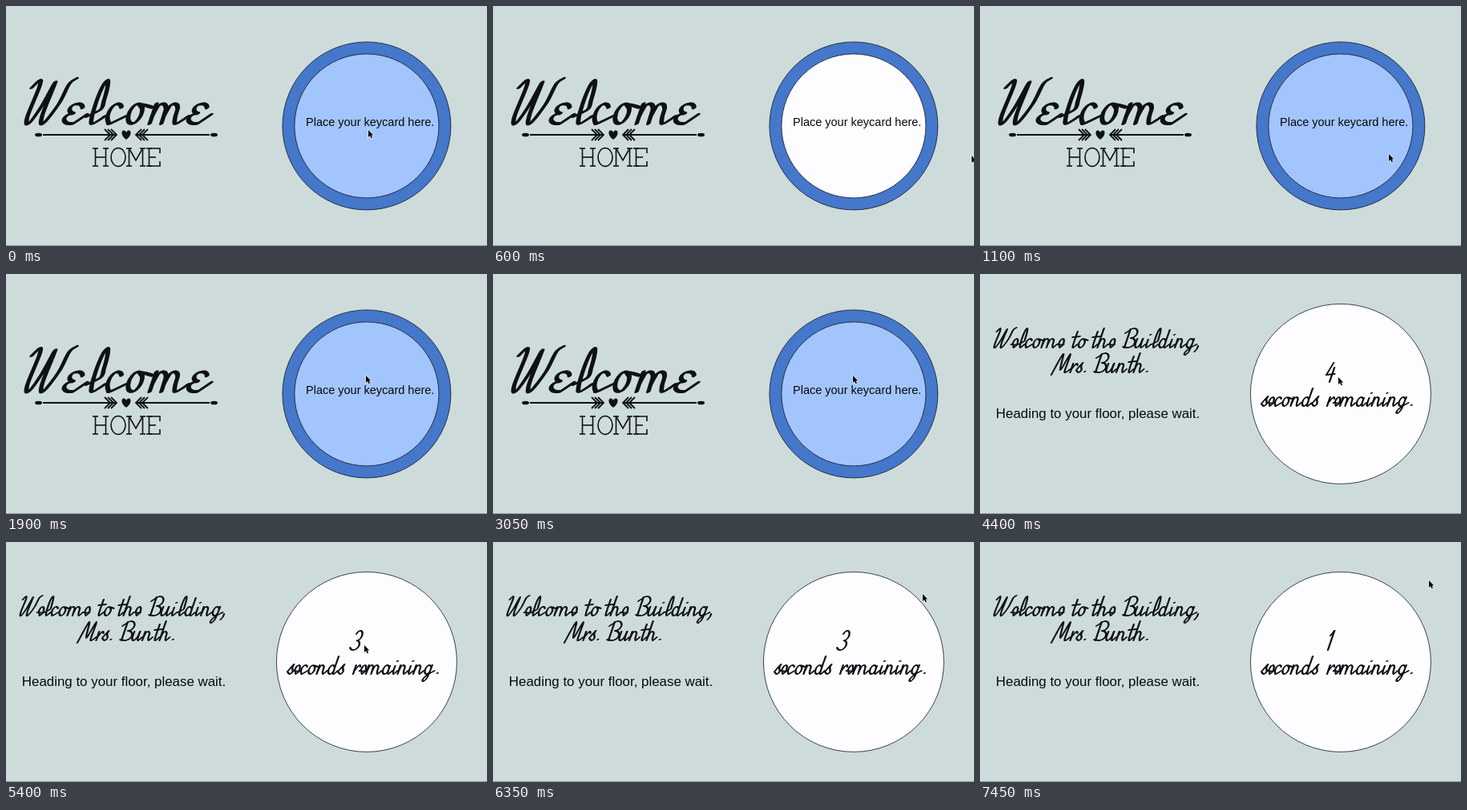
An HTML page with a canvas for the animation above (8000 ms loop, 600x300 px).

```html
<!DOCTYPE html>
<html lang="en">
<head>
<meta charset="utf-8">
<title>Keycard lift panel</title>
<style>
  html, body { margin: 0; width: 100%; height: 100%; overflow: hidden; background: #cddcdb; }
  canvas { display: block; }
</style>
</head>
<body>
<canvas id="stage" width="600" height="300" aria-label="Keycard reader and lift countdown"></canvas>
<script>
const ctx = document.getElementById('stage').getContext('2d');
const LOOP = 8000, STEP = 50, ARRIVAL = 3350, SECOND = 1016;
const INK = '#0e1013';
const X = 11, ASC = 24; // x-height and ascender of the script

// Script letters are assembled from arcs, bowls, stems, arches and loops.
let link = 1; // extra length of the joining strokes

const arc = (cx, cy, rx, ry, from, to) => Array.from({ length: 10 }, (_, i) => {
  const a = (from + (to - from) * i / 9) * Math.PI / 180;
  return [cx + rx * Math.cos(a), cy + ry * Math.sin(a)];
});
const exit = (x, y = -4) => [x + link, y];
const foot = x => [[x, -3], [x + 1.6, 0], exit(x + 4)];
const stem = (x, h) => [[x, -h], ...foot(x)];
const post = (x, h) => [[x, -h], [x, 0]];
const dot = (x, y) => [[x, y], [x + 0.8, y - 0.3]];
const round = (from, to) => arc(4.5, -X / 2, 3.5, X / 2, from, to);
const bowl = () => round(-40, -330);
const loop = (h, w) => [[0, -4], ...arc(4.5, -h / 2, w, h / 2, 20, -190), ...foot(3)];
const arch = (x, end = foot) => [[x, -4], ...arc(x + 3.5, 4 - X, 2.8, 4, -150, -10), ...end(x + 6.5)];
const drop = x => [[x, 0]];

const glyphs = {
  a: () => [bowl(), stem(8, X - 1)],
  c: () => [[...round(-40, -260), exit(8)]],
  d: () => [bowl(), stem(8, 22)],
  e: () => [loop(X, 2.8)],
  g: () => [bowl(), [[8, -X], [7, 4], [4, 9], [2, 7], [5, 2], exit(12)]],
  h: () => [post(1, ASC), arch(1)],
  i: () => [stem(1, X - 1), dot(1.5, -16)],
  l: () => [loop(ASC, 2)],
  m: () => [post(1, X), arch(1, drop), arch(7.5)],
  n: () => [post(1, X), arch(1)],
  o: () => [[...round(-60, -430), exit(10, -9)]],
  r: () => [post(1, X), [[1, -4], [5, -X], [7, 2 - X]]],
  s: () => [[[0, -3], [5, -12], [4.5, -8], [6.5, -3], [4, 0], [1, -2]]],
  t: () => [stem(3, 20), [[-1, -13], [8, -14]]],
  u: () => [[[1, -X], [1, -3], [3.5, 0], [7, -4], [8, -X]], stem(8, X)],
  'ε': () => [[...arc(5, -8.3, 3.5, 2.7, -10, -260), ...arc(4.5, -2.8, 4.2, 2.8, -110, -300), exit(9, -5)]],
  B: () => [post(3, 23), [[-2, -18], ...arc(7, -18, 6, 6, -150, 80), ...arc(7, -6, 7, 6, -90, 110), [1, -1]]],
  M: () => [[[-1, 3], [5, -23], [8, -3], [14, -23], ...foot(14)]],
  W: () => [[[0, -20], [3, -24], [4, -20], [3, -4], [5, 0], [9, -10], [12, -23],
             [11, -5], [13, 0], [18, -11], [20, -22], [23, -25]]],
  '.': () => [dot(4, -1)],
  ',': () => [[[2, -2], [2, 1], [0, 5]]],
  1: () => [[[2, -18], [5, -24]], post(5, 24)],
  2: () => [[...arc(5, -18, 4, 6, -170, 30), [0, 0]], [[0, 0], [9, -1]]],
  3: () => [[...arc(5, -18, 4, 6, -160, 90), ...arc(4, -6, 5.5, 6, -80, 150)]],
  4: () => [[[4, -24], [0, -9]], [[0, -9], [10, -10]], post(7, 18)],
  5: () => [[[10, -24], [4, -24]], [[4, -24], [2, -14], ...arc(4, -7, 6, 7, -90, 140)]]
};

// Catmull-Rom curve through the points
function trace(pts) {
  const at = i => pts[Math.max(0, Math.min(pts.length - 1, i))];
  ctx.beginPath();
  ctx.moveTo(...pts[0]);
  for (let i = 0; i < pts.length - 1; i++) {
    const [a, b, c, d] = [at(i - 1), at(i), at(i + 1), at(i + 2)];
    ctx.bezierCurveTo(b[0] + (c[0] - a[0]) / 6, b[1] + (c[1] - a[1]) / 6,
                      c[0] - (d[0] - b[0]) / 6, c[1] - (d[1] - b[1]) / 6, ...c);
  }
}

function script(text, x, y, { size = 1, wide = 2.6, thin = 1.6, join = 1 } = {}) {
  link = join;
  ctx.strokeStyle = INK;
  ctx.lineCap = ctx.lineJoin = 'round';
  for (const ch of text) {
    const strokes = glyphs[ch]();
    for (const pts of strokes) {
      ctx.save();
      ctx.transform(size, 0, -0.34 * size, size, x, y);
      trace(pts);
      ctx.restore();
      ctx.save();
      ctx.rotate(-0.45);
      ctx.scale(wide, thin);
      ctx.lineWidth = 1;
      ctx.stroke();
      ctx.restore();
    }
    x += size * (Math.max(...strokes.flat().map(p => p[0])) + 0.5);
  }
  ctx.lineCap = 'butt';
  ctx.lineJoin = 'miter';
}

function disc(r, fill) {
  ctx.beginPath();
  ctx.arc(449.9, 149.9, r, 0, Math.PI * 2);
  ctx.fillStyle = fill;
  ctx.fill();
  ctx.lineWidth = 0.8;
  ctx.strokeStyle = '#14181f';
  ctx.stroke();
}

function label(text, x, y, size) {
  ctx.font = `${size}px "Liberation Sans", Arial, sans-serif`;
  ctx.fillStyle = '#08090b';
  ctx.fillText(text, x, y);
}

function line(...pts) {
  ctx.beginPath();
  pts.forEach(p => ctx.lineTo(...p));
  ctx.stroke();
}

function feathered(side) {
  ctx.save();
  ctx.translate(150, 161);
  ctx.scale(side, 1);
  ctx.beginPath();
  ctx.ellipse(-109.5, 0, 4.5, 2.3, 0, 0, Math.PI * 2);
  ctx.fill();
  ctx.lineWidth = 1.8;
  line([-104, 0], [-12, 0]);
  for (let x = -12; x >= -20; x -= 4) line([x - 7, -7], [x, 0], [x - 7, 7]);
  ctx.restore();
}

function typewriterHome() {
  const top = 178, mid = 189, base = 200;
  ctx.lineWidth = 1.6;
  for (const x of [111.5, 124.5, 153.5, 170.5, 178.5]) {
    line([x, top], [x, base]);
    for (const y of [top, base]) line([x - 3.5, y], [x + 3.5, y]);
  }
  line([111.5, mid], [124.5, mid]);
  line([153.5, top], [162, 193], [170.5, top]);
  line([178, mid], [187, mid]);
  for (const [y, lip] of [[top, 6], [base, -6]]) line([178, y], [192, y], [192, y + lip]);
  ctx.beginPath();
  ctx.ellipse(140, mid, 9, 11.5, 0, 0, Math.PI * 2);
  ctx.stroke();
}

const heart = new Path2D('M150 167C142 161 144 154.5 147.5 155.5Q149.5 156 150 158Q150.5 156 152.5 155.5C156 154.5 158 161 150 167Z');
const arrow = new Path2D('M0 0V9L2 7 3.5 10.3 5 9.6 3.6 6.5H6.2Z');

function sign() {
  script('Wεlcomε', 17, 147, { size: 2.25, wide: 6.4, thin: 2.8, join: 2.9 });
  ctx.fillStyle = ctx.strokeStyle = INK;
  feathered(1);
  feathered(-1);
  ctx.fill(heart);
  typewriterHome();
}

const ramp = (t, from, to) => Math.max(0, Math.min(1, (t - from) / (to - from)));
const smooth = f => f * f * (3 - 2 * f);

// The pointer leaves to the right, swings back, rests, then moves up and away.
function pointerAt(t) {
  const out = smooth(ramp(t, 250, 700));
  const back = ramp(t, 700, 1900);
  const away = smooth(ramp(t, 6000, 6500));
  const x = 452 + 166 * out - 169 * (1 - (1 - back) ** 2.5) - 2 * ramp(t, 3600, 3950) + 113 * away;
  const y = 155 + 37 * out - 65 * back ** 2 + 2 * ramp(t, 3200, 4100) - 81 * away;
  return [Math.round(x), Math.round(y)];
}

function reader(x, y) {
  sign();
  disc(105, '#4577cb');
  disc(90, Math.hypot(x - 450, y - 150) < 90 ? '#a3c5fd' : '#fdfcff');
  label('Place your keycard here.', 374, 150, 14.5);
}

function countdown(t) {
  script('Welcome', 14, 92);
  script('to', 112, 92);
  script('the', 137, 92);
  script('Building,', 177, 92, { join: 1.4 });
  script('Mrs.', 91, 123, { join: 2 });
  script('Bunth.', 141, 123);
  label('Heading to your floor, please wait.', 19.8, 180, 16.9);
  disc(112.5, '#fdfcff');
  script(String(5 - Math.floor((t - ARRIVAL) / SECOND)), 429, 135);
  script('seconds', 350, 165);
  script('remaining.', 432, 165);
}

function draw(t) {
  const [x, y] = pointerAt(t);
  ctx.fillStyle = '#cddcdb';
  ctx.fillRect(0, 0, 600, 300);
  if (t < ARRIVAL) reader(x, y);
  else countdown(t);
  ctx.fillStyle = '#8f9999';
  ctx.fillRect(0, 299, 600, 1);
  ctx.save();
  ctx.translate(x, y);
  ctx.lineWidth = 1.2;
  ctx.strokeStyle = '#eef2f4';
  ctx.stroke(arrow);
  ctx.fillStyle = '#000';
  ctx.fill(arrow);
  ctx.restore();
}

const start = performance.now();
function tick() {
  const t = (performance.now() - start) % LOOP;
  draw(Math.floor(t / STEP) * STEP);
  requestAnimationFrame(tick);
}
tick();
</script>
</body>
</html>
```
